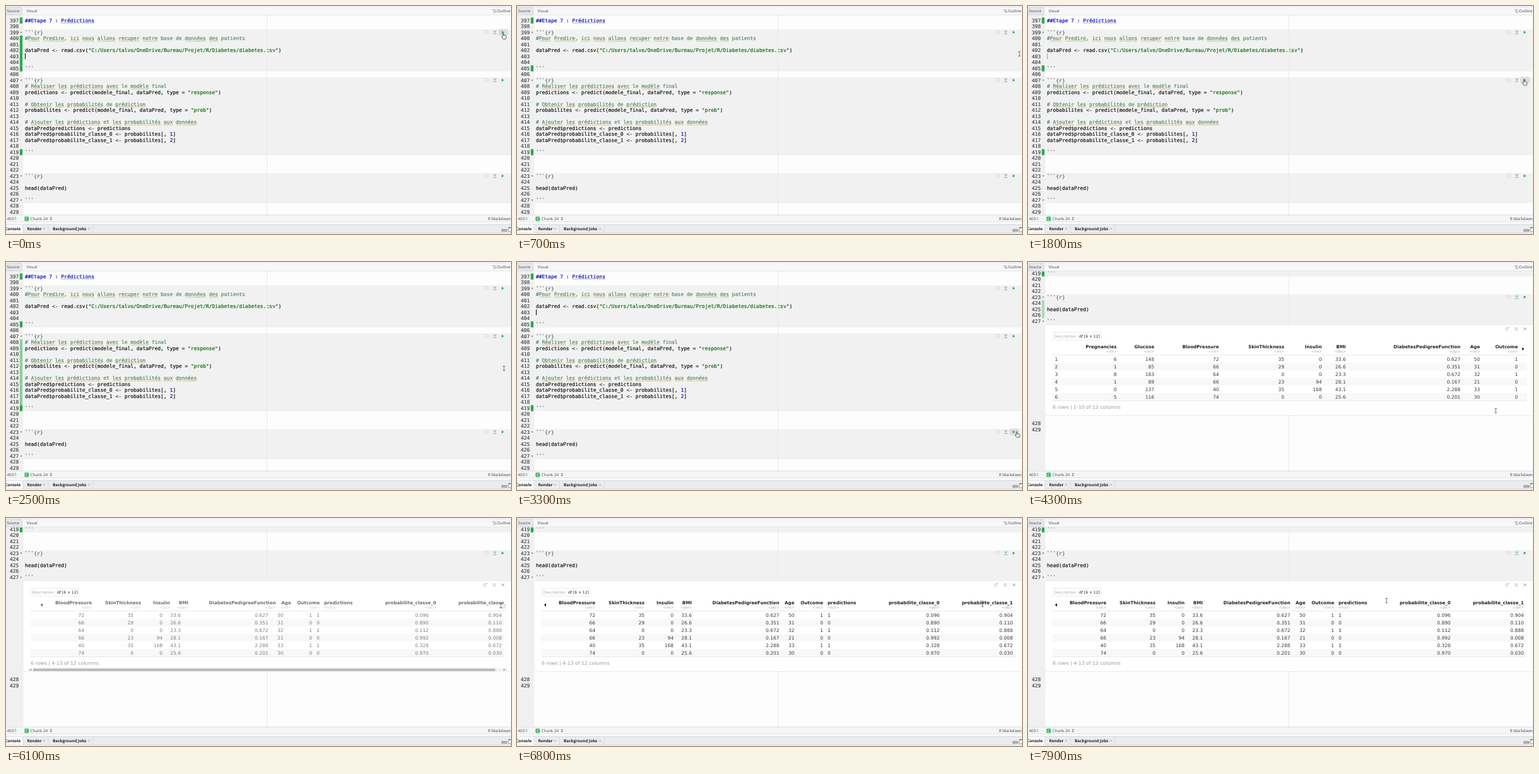
Animation of 800 by 362 pixels, one loop 8 s. Source, as an HTML page:

```html
<!DOCTYPE html>
<html lang="fr">
<head>
<meta charset="utf-8">
<title>Prédictions</title>
<style>
html, body { margin: 0; width: 100%; height: 100%; overflow: hidden; background: #fdfdfd; }
svg { display: block; width: 800px; height: 362px; }
text { white-space: pre; text-rendering: geometricPrecision; color: #222; fill: currentColor; }
.code { font: 7.95px "DejaVu Sans Mono", monospace; color: #111; stroke: currentColor; stroke-width: 0.18px; }
.num { color: #444; text-anchor: end; }
.title, .digit { color: #0000cd; }
.comment { color: #4c886b; }
.str { color: #036a07; }
.op { color: #333; }
.fence { color: #666; }
.ui { font: 6.2px "Open Sans", sans-serif; color: #444; }
.tab { font-weight: bold; font-size: 6.4px; color: #222; }
.cell { font: 7.5px "DejaVu Sans", sans-serif; color: #3a3a3a; }
.head { font: bold 7.12px "DejaVu Sans", sans-serif; }
.type { font: 5.5px "DejaVu Sans", sans-serif; color: #aaa; }
.desc { font: 6px "DejaVu Sans", sans-serif; }
.pale { color: #aaa; }
.foot { font: 7.74px "DejaVu Sans", sans-serif; color: #999; }
.end { text-anchor: end; }
</style>
</head>
<body>
<svg id="stage" viewBox="0 0 800 362">
  <defs>
    <clipPath id="pane"><rect y="15" width="800" height="316.5"/></clipPath>
    <clipPath id="table"><rect x="28" y="100" width="764" height="144"/></clipPath>
  </defs>
</svg>
<script>
const LOOP = 8000, STEP = 100;
const SCROLL_AT = 3900, PAGE_AT = 5900, SCROLL = 214, OUTPUT = 153;
const FIRST = 397, PITCH = 9.5, CHAR = 7.95 * 0.602, LEFT = 30;
const GREEN = '#22b14c';
const lineY = n => 22.7 + (n - FIRST) * PITCH;

const source = `##Etape 7 : Prédictions

\`\`\`{r}
#Pour Predire, ici nous allons recuper notre base de données des patients

dataPred <- read.csv("C:/Users/talvo/OneDrive/Bureau/Projet/R/Diabetes/diabetes.csv")


\`\`\`

\`\`\`{r}
# Réaliser les prédictions avec le modèle final
predictions <- predict(modele_final, dataPred, type = "response")

# Obtenir les probabilités de prédiction
probabilites <- predict(modele_final, dataPred, type = "prob")

# Ajouter les prédictions et les probabilités aux données
dataPred$predictions <- predictions
dataPred$probabilite_classe_0 <- probabilites[, 1]
dataPred$probabilite_classe_1 <- probabilites[, 2]

\`\`\`



\`\`\`{r}

head(dataPred)

\`\`\`

`.split('\n');
const chunks = [[399, 405], [407, 419], [423, 427]];

const stage = document.getElementById('stage');

function el(parent, name, attrs = {}, text) {
  const node = document.createElementNS('http://www.w3.org/2000/svg', name);
  for (const key in attrs) node.setAttribute(key, attrs[key]);
  if (text !== undefined) node.textContent = text;
  parent.appendChild(node);
  return node;
}
const group = (parent, attrs) => el(parent, 'g', attrs);
const rect = (parent, x, y, width, height, fill, more) =>
  el(parent, 'rect', { x, y, width, height, fill, ...more });
const label = (parent, x, y, cls, text) => el(parent, 'text', { x, y, class: cls }, text);
const fillPath = (parent, d, fill) => el(parent, 'path', { d, fill });
const line = (parent, d, stroke, width = 0.8) =>
  el(parent, 'path', { d, stroke, 'stroke-width': width, fill: 'none' });
const show = (node, on) => node.setAttribute('visibility', on ? 'visible' : 'hidden');
const move = (node, x, y) => node.setAttribute('transform', `translate(${x} ${y})`);

// Editor
const pane = group(stage, { 'clip-path': 'url(#pane)' });
rect(pane, 0, 15, 800, 317, '#fdfdfd');
rect(pane, 0, 15, 27.5, 317, '#f0f0f0');
const editor = group(pane);

function underline(parent, text, y) {
  for (const m of text.matchAll(/[A-Za-zÀ-ÿ]{3,}/g)) {
    if (['base', 'final', 'patients', 'Etape'].includes(m[0])) continue;
    const x = LEFT + m.index * CHAR;
    line(parent, `M${x} ${y + 4.6}h${m[0].length * CHAR}`, '#d9b45a', 0.8);
  }
}

function codeLine(parent, text, y) {
  const node = el(parent, 'text', { x: LEFT, y: y + 2.8, class: 'code' });
  if (text[0] === '#') {
    node.classList.add(text[1] === '#' ? 'title' : 'comment');
    node.textContent = text;
    underline(parent, text, y);
    return;
  }
  for (const part of text.split(/("[^"]*"|<-|=|\$|\b\d\b|`{3}(?:\{r\})?)/)) {
    if (!part) continue;
    const cls = part[0] === '"' ? 'str' : part[0] === '`' ? 'fence'
      : /^\d$/.test(part) ? 'digit' : /^(<-|=|\$)$/.test(part) ? 'op' : '';
    el(node, 'tspan', { class: cls }, part);
  }
}

function chunkIcons(parent, y) {
  const hover = rect(parent, 780, y - 5.2, 15, 10.5, '#dcdddd', { rx: 2 });
  rect(parent, 758.9, y - 2.7, 5.4, 5.4, 'none', { rx: 1.8, stroke: '#d2d4d5', 'stroke-width': 0.8 });
  el(parent, 'circle', { cx: 761.6, cy: y, r: 0.7, fill: '#d2d4d5' });
  line(parent, `M771.5 ${y - 2.5}h5.6`, '#a5b0aa', 0.7);
  fillPath(parent, `M772 ${y - 1.4}h4.6l-2.3 2.6z`, '#86c79a');
  line(parent, `M771.5 ${y + 2.5}h5.6`, '#4fbb6e');
  fillPath(parent, `M785.3 ${y - 2.5}l3.6 2.5l-3.6 2.5z`, GREEN);
  return hover;
}

for (const [a, b] of chunks) {
  rect(editor, 28, lineY(a) - 4.4, 772, (b - a + 1) * PITCH, '#f1f1f1');
}
const hovers = chunks.map(([a]) => chunkIcons(editor, lineY(a)));
const runBars = chunks.map(([a, b]) =>
  rect(editor, 21.8, lineY(a + 1) - 4.4, 4.3, (b - a - 1) * PITCH, GREEN));
for (const n of [397, 405, 419]) rect(editor, 21.8, lineY(n) - 4.4, 4.3, PITCH, GREEN);

const tail = group(editor);
source.forEach((text, i) => {
  const n = FIRST + i, y = lineY(n);
  label(n > 427 ? tail : editor, 20.3, y + 2.8, 'code num', n);
  if (text) codeLine(editor, text, y);
});
for (const [a, b] of chunks) {
  fillPath(editor, `M22.5 ${lineY(a) - 0.8}h3l-1.5 2z`, '#666');
  fillPath(editor, `M22.5 ${lineY(b) + 1}h3l-1.5 -2z`, '#666');
}
const caret = rect(editor, 30, lineY(403) - 4.4, 1, 9, '#000');
rect(pane, 413, 15, 1, 317, '#e9e9e9');

// Chunk output
const rows = [0, 1, 2, 3, 4, 5];
const values = {
  Pregnancies: '6 1 8 1 0 5',
  Glucose: '148 85 183 89 137 116',
  BloodPressure: '72 66 64 66 40 74',
  SkinThickness: '35 29 0 23 35 0',
  Insulin: '0 0 0 94 168 0',
  BMI: '33.6 26.6 23.3 28.1 43.1 25.6',
  DiabetesPedigreeFunction: '0.627 0.351 0.672 0.167 2.288 0.201',
  Age: '50 31 32 21 33 30',
  Outcome: '1 0 1 0 1 0',
  predictions: '1 0 1 0 1 0',
  probabilite_classe_0: '0.096 0.890 0.112 0.992 0.328 0.970'
};
for (const key in values) values[key] = values[key].split(' ');
values.probabilite_classe_1 = values.probabilite_classe_0.map(p => (1 - p).toFixed(3));

const output = group(pane);
rect(output, 28, 99.5, 772, 144, '#fff');
line(output, 'M28 99.5H800M28 243.7H800', '#e4e4e4');
rect(output, 39, 111.5, 77, 12.5, '#fff', { stroke: '#e2e2e2', 'stroke-width': 0.7, rx: 1 });
label(output, 41.5, 120, 'desc pale', 'Description:');
label(output, 81, 120, 'desc', 'df [6 × 12]');
rect(output, 756.3, 104.5, 3.6, 4, 'none', { stroke: '#c4c4c4', 'stroke-width': 0.7 });
line(output, 'M758.5 106.5l3.4-3.4m-2 0h2v2', '#bbb', 0.7);
line(output, 'M771.4 106l2.2-2l2.2 2M771.4 108.8l2.2-2l2.2 2', '#888', 0.8);
line(output, 'M785.2 104.2l4 4m0-4l-4 4', '#777', 0.8);
for (const r of rows) if (r % 2) rect(output, 39, 148 + r * 12, 751, 12, '#f8f8f8');
line(output, 'M39 147.7H790M39 220.3H790', '#dedede', 0.7);

function tablePage(columns, range) {
  const page = group(output, { 'clip-path': 'url(#table)' });
  const body = group(page), heads = group(page);
  for (const [name, type, x] of columns) {
    const align = type === 'fctr' ? '' : ' end';
    label(heads, x, 137.2, 'head' + align, name);
    label(heads, x, 143.8, 'type' + align, `<${type}>`);
    for (const r of rows) label(body, x, 156.8 + r * 12, 'cell' + align, values[name][r]);
  }
  label(page, 39, 232.8, 'foot', `6 rows | ${range} of 12 columns`);
  return { page, body, heads };
}

const one = tablePage([
  ['Pregnancies', 'int', 140.5], ['Glucose', 'int', 200], ['BloodPressure', 'int', 302.5],
  ['SkinThickness', 'int', 406], ['Insulin', 'int', 465.5], ['BMI', 'dbl', 503.5],
  ['DiabetesPedigreeFunction', 'dbl', 685], ['Age', 'int', 716], ['Outcome', 'int', 776]
], '1-10');
for (const r of rows) label(one.body, 42.5, 156.8 + r * 12, 'cell', r + 1);
fillPath(one.heads, 'M782.8 135.4l3.3 2.6l-3.3 2.6z', '#111');

const two = tablePage([
  ['BloodPressure', 'int', 124], ['SkinThickness', 'int', 202], ['Insulin', 'int', 248],
  ['BMI', 'dbl', 277], ['DiabetesPedigreeFunction', 'dbl', 415.5], ['Age', 'int', 439.5],
  ['Outcome', 'int', 485], ['predictions', 'fctr', 492],
  ['probabilite_classe_0', 'dbl', 669.5], ['probabilite_classe_1', 'dbl', 785.5]
], '4-13');
fillPath(two.heads, 'M46 135.4l-3.3 2.6l3.3 2.6z', '#111');

const hbar = group(output);
rect(hbar, 34, 238.6, 760, 4.8, '#f1f1f1');
rect(hbar, 43, 238.9, 732, 4.2, '#bcbcbc');
fillPath(hbar, 'M39.8 239.5v3l-2.2-1.5zM788.4 239.5v3l2.2-1.5z', '#666');

// Window frame
rect(stage, 0, 0, 800, 15, '#f6f7f8');
line(stage, 'M0 1.2H800M0 14.3H800', '#e2e4e6');
rect(stage, -2, 2.2, 27.5, 11.5, '#e6e8ea', { stroke: '#c9cdd0', 'stroke-width': 0.7, rx: 1.5 });
label(stage, 1.5, 10.4, 'ui', 'Source');
label(stage, 32.5, 10.4, 'ui', 'Visual');
line(stage, 'M770.5 6h5M772 8h5M772 10h5', '#888');
label(stage, 777.8, 10.4, 'ui', 'Outline');

rect(stage, 0, 331.5, 800, 11.5, '#f4f5f6');
line(stage, 'M0 331.8H800M0 342.8H800', '#d8dbdd');
label(stage, 1.5, 339.8, 'ui', '403:1');
rect(stage, 29.5, 334.6, 6.6, 6.6, '#2fb457', { rx: 1 });
line(stage, 'M34.3 336.7a1.7 1.7 0 1 0 0 2.4', '#fff');
label(stage, 38.8, 339.8, 'ui', 'Chunk 24');
fillPath(stage, 'M69.5 337l1.7-2l1.7 2zM69.5 338.6h3.4l-1.7 2z', '#666');
label(stage, 763.5, 339.8, 'ui', 'R Markdown');

rect(stage, 0, 343.2, 800, 4, '#fafafa');
rect(stage, 0, 347, 800, 13.5, '#eaedef');
line(stage, 'M0 347H800M0 360.6H800', '#c9cdd0');
rect(stage, 0, 347.4, 27, 13, '#fafafa');
line(stage, 'M27 347V360.5M67 347V360.5M138 347V360.5', '#d0d4d7', 0.7);
for (const [x, name] of [[-1.8, 'Console'], [33.5, 'Render'], [74, 'Background Jobs']])
  label(stage, x, 356, 'ui tab', name);
line(stage, 'M58.8 352.2l3 3m0-3l-3 3M130 352.2l3 3m0-3l-3 3', '#999', 0.7);
rect(stage, 785.5, 354.8, 8, 3, '#b4babe', { stroke: '#7d858b', 'stroke-width': 0.8 });
rect(stage, 796, 351.5, 7, 6.5, '#fff', { stroke: '#7d858b', 'stroke-width': 0.8 });
line(stage, 'M796 352.2h5', '#7d858b', 1.4);

// Pointer
const beam = group(stage);
line(beam, 'M-1.8 -3.6h1.4l.4 .4l.4 -.4h1.4M0 -3.2V3.2M-1.8 3.6h1.4l.4 -.4l.4 .4h1.4', '#444', 0.8);
const hand = group(stage);
el(hand, 'path', {
  d: 'M-1.9 1.8V-3.4Q-1.2 -4.4 -.5 -3.4V-.4L2.6 .1Q3.6 .4 3.5 1.6L2.8 5.4H-1.6L-3.8 2Q-3.6 1 -2.6 1.4Z',
  fill: '#fff', stroke: '#333', 'stroke-width': 0.8, 'stroke-linejoin': 'round'
});

const path = [
  [0, 789, 47], [300, 789, 47], [700, 796, 76], [1000, 796, 78], [1500, 787, 120.5],
  [2200, 787, 120.5], [3000, 793, 273], [3700, 793, 273], [4300, 741, 236],
  [4600, 741, 236], [5300, 784, 139], [6500, 784, 139], [7500, 568, 131], [LOOP, 568, 131]
];

function pointerAt(t) {
  const i = path.findIndex(p => p[0] > t);
  const [t0, x0, y0] = path[i - 1], [t1, x1, y1] = path[i];
  const k = (t - t0) / (t1 - t0), e = k * k * (3 - 2 * k);
  return [x0 + (x1 - x0) * e, y0 + (y1 - y0) * e];
}

const clamp = v => Math.max(0, Math.min(1, v));
const runStart = [-200, 2000, 3700];
const runOpacity = (t, start) => t < start ? 0 : clamp(1 - (t - start - 200) / 600);

function caretOpacity(t) {
  const phase = t % 1000;
  return phase < 500 ? 1 : phase < 800 ? 0 : phase < 900 ? 0.35 : 0.7;
}

function render(t) {
  const scrolled = t >= SCROLL_AT, second = t >= PAGE_AT;
  move(editor, 0, scrolled ? -SCROLL : 0);
  move(tail, 0, scrolled ? OUTPUT : 0);
  output.setAttribute('display', scrolled ? 'inline' : 'none');
  caret.setAttribute('opacity', caretOpacity(t));
  runBars.forEach((bar, i) => bar.setAttribute('opacity', runOpacity(t, runStart[i])));

  const slide = second ? Math.max(0, (6200 - t) * 0.12) : 0;
  show(one.page, !second);
  show(two.page, second);
  move(two.heads, slide, 0);
  const dim = slide > 0 ? 0.65 : 1;
  two.heads.setAttribute('opacity', dim);
  two.body.setAttribute('opacity', dim);
  show(hbar, slide > 0);

  const [x, y] = pointerAt(t);
  const over = chunks.map(([a]) => !scrolled && Math.abs(y - lineY(a) - 3) < 6);
  over.forEach((on, i) => show(hovers[i], on));
  const onNext = scrolled && !second && x > 781 && Math.abs(y - 138) < 6;
  const pointing = onNext || over.includes(true);
  show(hand, pointing);
  show(beam, !pointing);
  move(pointing ? hand : beam, x, y);
}

const begin = performance.now();
function tick() {
  const t = (performance.now() - begin) % LOOP;
  render(Math.floor(t / STEP) * STEP);
  requestAnimationFrame(tick);
}
tick();
</script>
</body>
</html>
```
